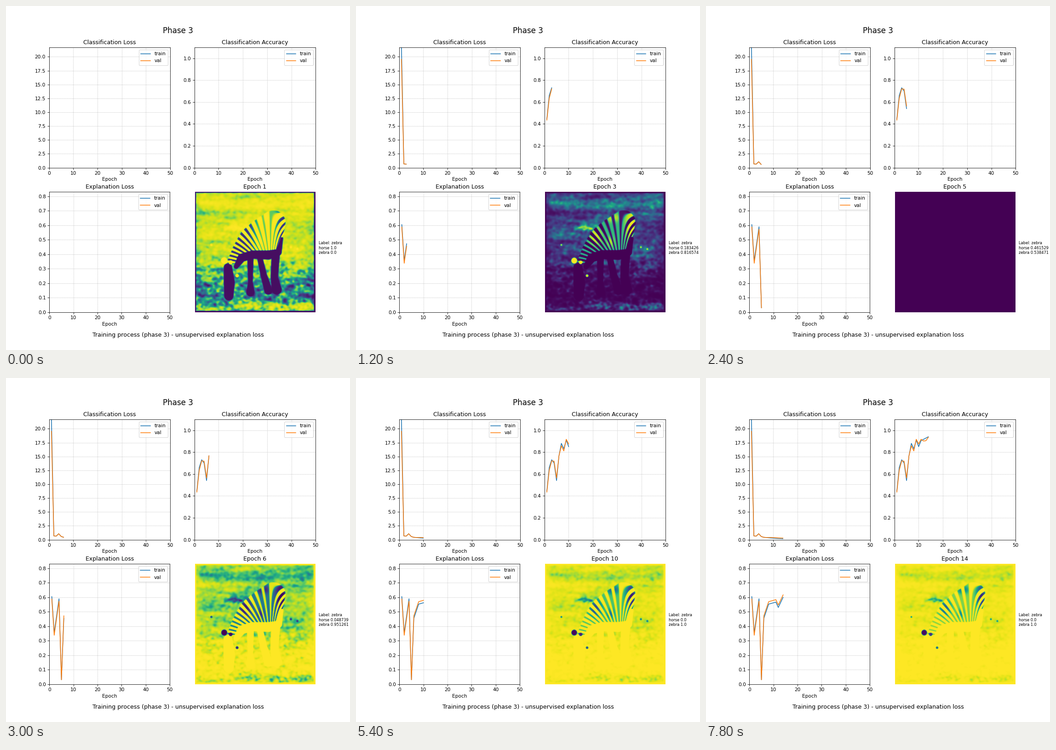
Animation, 748 px wide and 748 px high, one loop 8000 ms. Source, as a matplotlib script:

```python
import numpy as np
import matplotlib.pyplot as plt
from matplotlib.animation import FuncAnimation

SIZE = 748
STEP_MS = 200
TICKS_PER_EPOCH = 3
TICKS = 40
EPOCHS = np.arange(1, 15)

plt.rcParams.update({"font.family": "DejaVu Sans", "font.size": 10.1,
                     "axes.titlesize": 12.1, "axes.titlepad": 6.7,
                     "axes.labelpad": 3.4})

# Score of the wrong class; the other one is the rest to 1.
HORSE = {1: 1.0, 2: .462442, 3: .183426, 5: .461529, 6: .048739,
         7: .012354, 12: 2.4e-05}


def ramp(a):
    return 1 / (1 + np.exp(-np.clip(a, -40, 40)))


def mix(a, b, w):
    return a + (b - a) * w


# ---- training curves ----
def through(*points):
    return np.interp(EPOCHS, *zip(*points))


def loss_curves():
    decay = .75 * np.exp(-(EPOCHS - 1) / 9)
    relapse = .55 * np.exp(-(EPOCHS - 4.1) ** 2 / .5)
    start = np.exp(-9 * (EPOCHS - 1))
    train = decay + relapse + 21.3 * start
    return train, train - 2.5 * start + .1 * ramp(2 * (EPOCHS - 8))


def accuracy_curves():
    train = through((1, .445), (2, .66), (3, .73), (4, .70), (5, .54), (6, .765),
                    (7, .88), (8, .83), (9, .91), (10, .85), (11, .905), (14, .94))
    return train, train - .025 * np.cos(2 * np.pi * (EPOCHS - 2) / 5.4)


def explanation_curves():
    train = through((1, .605), (2, .355), (4, .59), (5, .03), (6, .455),
                    (8, .553), (11, .567), (12, .53), (14, .60))
    return train, train + .017 * np.sign(EPOCHS - 5)


LOSS, ACCURACY, EXPLANATION = loss_curves(), accuracy_curves(), explanation_curves()

# ---- brightness field behind the mask, in stage pixels ----
Y, X = np.mgrid[404:666, 411:673].astype(float)
rng = np.random.default_rng(7)


def noise(sx, sy):
    """Smooth random texture with unit deviation."""
    fx = np.fft.fftfreq(X.shape[1])
    fy = np.fft.fftfreq(X.shape[0])[:, None]
    kernel = np.exp(-2 * np.pi ** 2 * ((fx * sx) ** 2 + (fy * sy) ** 2))
    n = np.fft.ifft2(np.fft.fft2(rng.standard_normal(X.shape)) * kernel).real
    return n / n.std()


def bump(x, y, sx, sy, amp):
    return amp * np.exp(-((X - x) / sx) ** 2 / 2 - ((Y - y) / sy) ** 2 / 2)


def limb(*joints):
    """Soft tube through joints (x, y, radius)."""
    steps = np.linspace(0, len(joints) - 1, 16 * len(joints))
    x, y, r = (np.interp(steps, range(len(joints)), c) for c in zip(*joints))
    depth = np.full(X.shape, -99.0)
    for cx, cy, cr in zip(x, y, r):
        depth = np.maximum(depth, cr - np.hypot(X - cx, Y - cy))
    return ramp(2 * depth)


def background():
    fine, streak = noise(2.6, 2.2), noise(18, 3)
    base = np.interp(Y, [404, 428, 450, 555, 595, 638, 652],
                     [.46, .56, .51, .48, .24, .2, .39])
    low = ramp((Y - 560) / 12)
    b = base + .035 * streak + fine * mix(.035, .085, low)
    b += bump(440, 451, 48, 4.5, -.2)             # dark streak in the sky
    b += bump(560, 432, 42, 6, .12)               # bright streaks
    b += bump(505, 454, 32, 3, .07)
    b += bump(411, 500, 9, 90, -.1) + bump(672, 500, 9, 90, -.1)
    return b + bump(502, 482, 13, 4.5, .26) * (1 + .5 * fine)


def coat():
    dx, dy = X - 575, 590 - Y
    phase = 75 * np.arctan2(dy, dx) + .2 * dx + .01 * np.maximum(dx, 0) * (dy - 115)
    neck = ramp((538 - X) / 5)
    rump = ramp((X - 590) / 3)
    stripe = ramp(4 * (np.sin(phase) + .45 * (1 - neck) * (1 - rump)))
    black = .3 * (1 - neck) * (1 - rump)
    white = .7 + bump(520, 500, 9, 13, .26) + bump(558, 460, 9, 6, .2)
    white += bump(598, 475, 7, 20, .4) + bump(553, 512, 5, 7, .15)
    return mix(black, white, stripe)


def brightness():
    body = limb((488, 555, 7), (510, 528, 17), (535, 508, 29), (562, 498, 39),
                (581, 470, 26))
    b = mix(background(), coat(), body)
    dark = [limb((482, 568, 9), (485, 600, 12), (484, 630, 10)),
            limb((500, 566, 5), (512, 547, 9), (535, 540, 9), (570, 541, 10),
                 (592, 535, 7), (599, 505, 3)),
            limb((531, 545, 7), (531, 600, 5), (531, 622, 9)),
            limb((551, 545, 6), (560, 585, 7), (570, 618, 9)),
            limb((586, 540, 9), (583, 590, 8), (588, 616, 11))]
    for part in dark:
        b = mix(b, -.1, part)
    for x, y, r in [(474, 553, 6), (488, 557, 4), (502, 586, 3), (446, 519, 2),
                    (619, 524, 2), (633, 528, 2)]:
        b = mix(b, .7 + .08 * r, limb((x, y, r)))
    edge = np.minimum.reduce([X - 411, 671 - X, Y - 404, 664 - Y])
    return mix(-.15, b, ramp((edge - 1.5) * 2))


FIELD = brightness()


def mask(epoch):
    """Threshold the brightness; the polarity flips after the collapse."""
    level = EXPLANATION[0][epoch - 1]
    if epoch < 6:
        return ramp((FIELD - (1.64 - 2.4 * level + .04 * epoch)) / .1)
    return ramp((.06 + 1.3 * level - FIELD) / .1)


# ---- figure ----
fig, axes = plt.subplots(2, 2, figsize=(10, 10), dpi=SIZE / 10)
fig.suptitle("Phase 3", fontsize=16.1, y=.94)
fig.text(.5, .039, "Training process (phase 3) - unsupervised explanation loss",
         ha="center", fontsize=12.2)


def chart(ax, title, top, step):
    ax.set_title(title)
    ax.set_xlabel("Epoch")
    ax.set_xlim(0, 50)
    ax.set_ylim(0, top)
    ax.set_xticks(range(0, 51, 10))
    ax.set_yticks(np.arange(0, top, step))
    ax.grid(linestyle="--", linewidth=.5)
    lines = [ax.plot([], [], label=name)[0] for name in ("train", "val")]
    ax.legend(loc="upper right")
    return lines


curves = [(chart(axes[0, 0], "Classification Loss", 21.72, 2.5), LOSS),
          (chart(axes[0, 1], "Classification Accuracy", 1.1, .2), ACCURACY),
          (chart(axes[1, 0], "Explanation Loss", .832, .1), EXPLANATION)]
axes[1, 0].set_box_aspect(1)

view = axes[1, 1]
view.axis("off")
picture = view.imshow(mask(1), cmap="viridis", vmin=0, vmax=1,
                      interpolation="nearest")
heading = view.set_title("Epoch 1")
scores = fig.text(680 / SIZE, 1 - 539 / SIZE, "", fontsize=8, va="baseline")


def draw(tick):
    epoch = tick // TICKS_PER_EPOCH + 1
    for lines, series in curves:
        for line, values in zip(lines, series):
            line.set_data(EPOCHS[:epoch], values[:epoch])
    picture.set_data(mask(epoch))
    heading.set_text(f"Epoch {epoch}")
    horse = HORSE.get(epoch, 0.0)
    scores.set_text(f"Label: zebra\nhorse {horse}\nzebra {round(1 - horse, 6)}")
    return []


anim = FuncAnimation(fig, draw, frames=TICKS, interval=STEP_MS,
                     repeat=True, repeat_delay=0)
plt.show()
```
